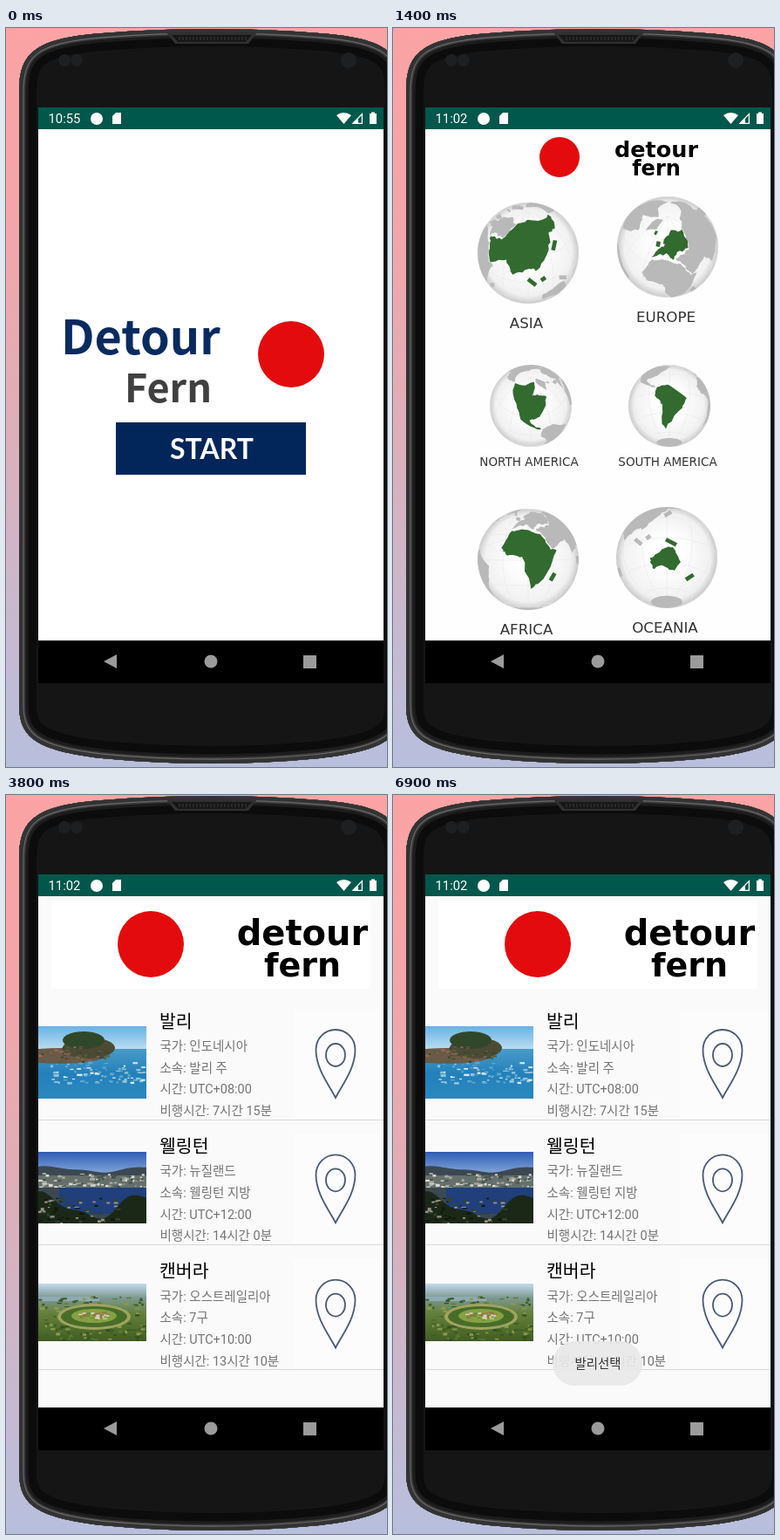
Write an HTML page with a canvas that moves like this. It is 437 px wide and 847 px high and loops after 8000 ms.

```html
<!DOCTYPE html>
<html lang="ko">
<head>
<meta charset="utf-8">
<style>
html, body { margin: 0; width: 100%; height: 100%; overflow: hidden; }
canvas { display: block; }
</style>
</head>
<body>
<canvas id="stage" width="437" height="847"></canvas>
<script>
const W = 437, H = 847, LOOP = 8000, TAU = Math.PI * 2;
const SCREEN = { x: 37, y: 91, w: 396, h: 660, cx: 235, cy: 421 };
const UI = "Roboto, 'Noto Sans CJK KR', sans-serif";
const TITLE = "'Noto Sans CJK KR', 'Noto Sans', sans-serif";
const WIDE = "'DejaVu Sans', sans-serif";
const NAVY = '#02265a', RED = '#e30b0e';

const stage = document.getElementById('stage').getContext('2d');

function layer(paint) {
  const canvas = document.createElement('canvas');
  canvas.width = W;
  canvas.height = H;
  paint(canvas.getContext('2d'));
  return canvas;
}

function random(seed) {
  return () => (seed = seed * 16807 % 2147483647) / 2147483647;
}

function rect(c, color, x, y, w, h) {
  c.fillStyle = color;
  c.fillRect(x, y, w, h);
}

function shape(c, color, path) {
  c.fillStyle = color;
  c.fill(new Path2D(path));
}

function disc(c, color, x, y, rx, ry = rx) {
  c.beginPath();
  c.ellipse(x, y, rx, ry, 0, 0, TAU);
  c.fillStyle = color;
  c.fill();
}

function text(c, str, x, y, font, color, align = 'left') {
  c.font = font;
  c.fillStyle = color;
  c.textAlign = align;
  c.fillText(str, x, y);
}

function gradient(c, y0, y1, colors) {
  const g = c.createLinearGradient(0, y0, 0, y1);
  colors.forEach((color, i) => g.addColorStop(i / (colors.length - 1), color));
  return g;
}

// Phone body and backdrop
const phone = layer(c => {
  rect(c, gradient(c, 0, H, ['#fba3a5', '#f3a6a9', '#e2adb6', '#ccb7ca', '#b7bfdd']), 0, 0, W, H);
  const body = new Path2D('M15 75C15 30 30 12 110 6Q235 -4 360 6C440 12 455 30 455 75' +
    'V775C455 812 438 828 360 837Q235 849 110 837C32 828 15 812 15 775Z');
  c.save();
  c.clip(body);
  rect(c, '#151515', 0, 0, W, H);
  // Nested strokes shade the rim from the inside out
  ['#0c0c0c', '#1c1c1c', '#383838', '#6a6a6a', '#333'].forEach((color, i) => {
    c.lineWidth = 40 / (1 + i * .9);
    c.strokeStyle = color;
    c.stroke(body);
  });
  c.restore();
  shape(c, '#303030', 'M184 5H288L278 18H194Z');
  shape(c, '#171717', 'M190 8H282L275 16H197Z');
  for (let x = 198; x < 276; x += 4) rect(c, '#292929', x, 10, 2, 4);
  for (const x of [67, 81, 393]) disc(c, '#1d1f20', x, 37, x < 100 ? 7 : 9);
});

function windowBase(c, color) {
  rect(c, '#00574b', SCREEN.x, 91, SCREEN.w, 25);
  rect(c, color, SCREEN.x, 116, SCREEN.w, 586);
  rect(c, '#000', SCREEN.x, 702, SCREEN.w, 49);
}

const startScreen = layer(c => {
  windowBase(c, '#fff');
  text(c, 'Detour', 63, 374, 'bold 54px ' + TITLE, '#0a2b60');
  text(c, 'Fern', 136, 429, 'bold 45px ' + TITLE, '#404040');
  disc(c, RED, 327, 374, 38);
  rect(c, NAVY, 126, 452, 218, 60);
  text(c, 'START', 236, 494, 'bold 32px Lato, sans-serif', '#fff', 'center');
});

// Rough coasts as longitude, latitude corners; the coastline between them is seeded noise
const LAND = {
  asia: [27, 38, 50, 43, 62, 68, 100, 76, 188, 67, 160, 54, 138, 53, 121, 30, 107, 15, 97, 17, 78, 8, 68, 24, 45, 13, 35, 30],
  europe: [-9, 37, -2, 48, 9, 54, 6, 60, 26, 71, 60, 67, 50, 45, 30, 45, 23, 37, 13, 45],
  africa: [-7, 35, 10, 37, 32, 31, 43, 12, 51, 11, 35, -22, 20, -35, 9, 4, -8, 5, -17, 14],
  northAmerica: [-166, 66, -95, 79, -68, 80, -92, 59, -77, 60, -56, 52, -81, 28, -97, 24, -80, 8, -106, 21, -124, 44],
  greenland: [-60, 79, -25, 82, -22, 70, -45, 60],
  southAmerica: [-78, 8, -62, 11, -35, -7, -40, -22, -68, -54, -75, -46, -70, -18, -81, -4],
  oceania: [114, -22, 133, -12, 142, -11, 153, -27, 146, -38, 130, -32, 115, -34],
};
const ISLES = [
  ['asia', 96, 4, 105, -5], ['asia', 111, 1, 116, 4], ['asia', 132, 33, 142, 42],
  ['oceania', 134, -2, 146, -8], ['oceania', 168, -46, 177, -38],
  ['africa', 45, -24, 49, -15], ['europe', -3, 51, -4, 57], ['europe', -22, 65, -15, 65],
];
const GLOBES = [
  { name: 'ASIA', land: 'asia', x: 155, y: 258, r: 58, lon: 96, lat: 35 },
  { name: 'EUROPE', land: 'europe', x: 315, y: 251, r: 58, lon: 15, lat: 52 },
  { name: 'NORTH AMERICA', land: 'northAmerica', x: 158, y: 433, r: 47, lon: -95, lat: 45 },
  { name: 'SOUTH AMERICA', land: 'southAmerica', x: 317, y: 433, r: 47, lon: -60, lat: -20 },
  { name: 'AFRICA', land: 'africa', x: 155, y: 609, r: 58, lon: 16, lat: 1 },
  { name: 'OCEANIA', land: 'oceania', x: 314, y: 607, r: 58, lon: 135, lat: -23 },
];

function coastline(corners, seed) {
  const rnd = random(seed), points = [], steps = 5;
  for (let i = 0; i < corners.length; i += 2) {
    const [x0, y0, x1, y1] = [0, 1, 2, 3].map(k => corners[(i + k) % corners.length]);
    for (let k = 0; k < steps; k++) {
      const rough = k ? 3 : 0;
      points.push([x0 + (x1 - x0) * k / steps + (rnd() - .5) * rough,
        y0 + (y1 - y0) * k / steps + (rnd() - .5) * rough]);
    }
  }
  return points;
}

// Orthographic projection; points behind the globe slide to its rim
function project(globe, [lon, lat]) {
  const rad = Math.PI / 180, d = (lon - globe.lon) * rad, a = lat * rad, b = globe.lat * rad;
  const x = Math.cos(a) * Math.sin(d);
  const y = Math.cos(b) * Math.sin(a) - Math.sin(b) * Math.cos(a) * Math.cos(d);
  const front = Math.sin(b) * Math.sin(a) + Math.cos(b) * Math.cos(a) * Math.cos(d) > 0;
  const k = globe.r / (front ? 1 : Math.hypot(x, y));
  return { x: x * k, y: -y * k, front };
}

function trace(c, globe, points) {
  const spots = points.map(p => project(globe, p));
  c.beginPath();
  if (spots.some(s => s.front)) spots.forEach(s => c.lineTo(s.x, s.y));
}

function drawGlobe(c, globe) {
  const r = globe.r, circle = Array.from({ length: 73 }, (_, i) => i * 5 - 180);
  const tint = name => name === globe.land ? '#336a30' : '#b9b9b9';
  c.save();
  c.translate(globe.x, globe.y);
  const shade = c.createRadialGradient(0, -r * .1, r * .3, 0, 0, r);
  shade.addColorStop(0, '#fff');
  shade.addColorStop(.8, '#f1f1f1');
  shade.addColorStop(1, '#c9c9c9');
  disc(c, shade, 0, 0, r);
  c.clip();
  c.strokeStyle = '#e4e4e4';
  c.lineWidth = .5;
  for (let line = -60; line <= 60; line += 30) {
    trace(c, globe, circle.map(lon => [lon, line]));
    c.stroke();
    trace(c, globe, circle.map(lat => [globe.lon + line, lat / 2]));
    c.stroke();
  }
  trace(c, globe, circle.map(lon => [lon, -72]));
  c.fillStyle = '#b9b9b9';
  c.fill();
  Object.keys(LAND).forEach((name, i) => {
    trace(c, globe, coastline(LAND[name], 77 + i));
    c.fillStyle = tint(name);
    c.fill();
  });
  c.lineWidth = r * .08;
  for (const [name, lon0, lat0, lon1, lat1] of ISLES) {
    const ends = [[lon0, lat0], [lon1, lat1]];
    if (!ends.every(p => project(globe, p).front)) continue;
    trace(c, globe, ends);
    c.strokeStyle = tint(name);
    c.stroke();
  }
  c.restore();
  text(c, globe.name, globe.x - 2, globe.y + r * 1.52 - 2, `${r * .288}px ${WIDE}`, '#333', 'center');
}

const globeScreen = layer(c => {
  windowBase(c, '#fefefe');
  disc(c, RED, 191, 148, 23);
  text(c, 'detour', 302, 148, 'bold 25.5px ' + WIDE, '#000', 'center');
  text(c, 'fern', 302, 169, 'bold 24px ' + WIDE, '#000', 'center');
  GLOBES.forEach(globe => drawGlobe(c, globe));
});

// Scenery, drawn from its own top-left corner, 124 wide
function ridge(c, color, y, rise, phase) {
  c.beginPath();
  c.moveTo(0, 90);
  for (let x = 0; x <= 124; x += 4) c.lineTo(x, y - rise * (Math.sin(x / 19 + phase) + Math.sin(x / 8 + phase) * .3));
  c.lineTo(124, 90);
  c.fillStyle = color;
  c.fill();
}

function scatter(c, colors, count, x, y, w, h) {
  const rnd = random(count + 5);
  for (let i = 0; i < count; i++) {
    rect(c, colors[i % colors.length], x + rnd() * w, y + rnd() * h, 2 + rnd() * 4, 1 + rnd() * 2);
  }
}

function coast(c) {
  rect(c, gradient(c, 0, 26, ['#69b2e6', '#b9dcef']), 0, 0, 124, 26);
  rect(c, gradient(c, 26, 83, ['#4a9bc8', '#2380ba', '#2c89bf']), 0, 26, 124, 57);
  scatter(c, ['#8fc3dc', '#d5e8ef', '#5ba6cd'], 80, 14, 40, 106, 24);
  disc(c, '#6a5a48', 24, 34, 52, 9);
  disc(c, '#4b4a34', 58, 25, 30, 12);
  disc(c, '#30472a', 52, 16, 24, 10);
  scatter(c, ['#8f6654', '#3d4630', '#59603c'], 45, 0, 22, 78, 18);
}

function harbour(c) {
  rect(c, gradient(c, 0, 26, ['#2f5cb4', '#86a9dc']), 0, 0, 124, 83);
  ridge(c, '#3b4852', 20, 3, 1);
  rect(c, '#65706c', 0, 27, 124, 14);
  scatter(c, ['#dad8d0', '#3f4f4c', '#a9a89e'], 90, 0, 24, 124, 16);
  rect(c, '#203f7b', 24, 41, 100, 30);
  ridge(c, '#1b2818', 62, 13, 1.4);
  scatter(c, ['#9a9482', '#33432a', '#11190f'], 75, 0, 52, 90, 30);
}

function gardens(c) {
  rect(c, gradient(c, 0, 66, ['#c3dbee', '#7c9890', '#66803e', '#52702d', '#425c24']), 0, 0, 124, 66);
  rect(c, '#8eabb4', 0, 15, 70, 5);
  scatter(c, ['#3f5d28', '#8a9a4c', '#5d7a36', '#34501f'], 140, 0, 14, 124, 50);
  disc(c, '#a0a45f', 64, 38, 42, 15);
  disc(c, '#486d29', 64, 38, 38, 12);
  disc(c, '#86a143', 64, 37, 26, 8);
  scatter(c, ['#d7d5bd', '#9a6d49', '#6c8a3a'], 28, 46, 32, 32, 8);
}

const PLACES = [
  { title: '발리', scene: coast, height: 83,
    lines: ['국가: 인도네시아', '소속: 발리 주', '시간: UTC+08:00', '비행시간: 7시간 15분'] },
  { title: '웰링턴', scene: harbour, height: 82,
    lines: ['국가: 뉴질랜드', '소속: 웰링턴 지방', '시간: UTC+12:00', '비행시간: 14시간 0분'] },
  { title: '캔버라', scene: gardens, height: 66,
    lines: ['국가: 오스트레일리아', '소속: 7구', '시간: UTC+10:00', '비행시간: 13시간 10분'] },
];

function drawPin(c, x, y) {
  c.save();
  c.translate(x, y);
  c.strokeStyle = '#4a5a73';
  c.lineWidth = 1.8;
  c.stroke(new Path2D('M0 79C-7 65 -22.5 46 -22.5 24A22.5 23 0 0 1 22.5 24C22.5 46 7 65 0 79Z'));
  c.beginPath();
  c.ellipse(0, 30, 11, 13, 0, 0, TAU);
  c.stroke();
  c.restore();
}

const listScreen = layer(c => {
  windowBase(c, '#fafafa');
  rect(c, '#fff', 52, 121, 366, 101);
  disc(c, RED, 166, 171, 38);
  text(c, 'detour', 340, 172, 'bold 40px ' + WIDE, '#000', 'center');
  text(c, 'fern', 340, 208, 'bold 38px ' + WIDE, '#000', 'center');
  PLACES.forEach(({ title, scene, height, lines }, i) => {
    const top = 229 + i * 143.3;
    rect(c, '#fcfcfc', 329, top + 16, 104, 126);
    c.save();
    c.translate(37, Math.round(top + 77.5 - height / 2));
    c.beginPath();
    c.rect(0, 0, 124, height);
    c.clip();
    scene(c);
    c.restore();
    text(c, title, 176, top + 37.5, '20.5px ' + UI, '#000');
    lines.forEach((line, n) => text(c, line, 176.5, top + 64 + n * 24.7, '14.5px ' + UI, '#747474'));
    drawPin(c, 378, top + 39);
    rect(c, '#d9d9d9', 37, Math.round(top + 142.5), 396, 1);
  });
});

function drawSystemIcons(c, clock) {
  text(c, clock, 48.5, 109, '14.8px Roboto, sans-serif', '#fff');
  disc(c, '#fff', 104, 104, 7);
  shape(c, '#fff', 'M126 97H132V110H122V101Z');
  shape(c, '#fff', 'M387.5 110L379 100Q387.5 94 396 100Z');
  c.strokeStyle = '#fff';
  c.lineWidth = 1.3;
  c.stroke(new Path2D('M398 109.3L408.4 98.5V109.3Z'));
  shape(c, '#fff', 'M397 110L404 103V110Z');
  shape(c, '#fff', 'M417 98H419V96.5H423V98H425V110H417Z');
  shape(c, '#9b9b9b', 'M112 726L127 718V734Z');
  disc(c, '#9b9b9b', 235, 726, 7.5);
  rect(c, '#9b9b9b', 341, 719, 15, 15);
}

function drawWindow(c, image, scale, alpha = 1) {
  const { x, y, w, h, cx, cy } = SCREEN;
  c.save();
  c.globalAlpha = alpha;
  c.translate(cx, cy);
  c.scale(scale, scale);
  c.drawImage(image, x, y, w, h, x - cx, y - cy, w, h);
  c.restore();
}

// Fast-out, extra-slow-in: a quick first sixth, then a long settling curve
function settle(p) {
  if (p >= .75) return 1;
  if (p < 1 / 6) return .4 * (p * 6) ** 2;
  let lo = 0, hi = 1;
  const bezier = (u, a, b, d) => a * (1 - u) ** 3 + 3 * b * u * (1 - u) ** 2 + 3 * d * u * u * (1 - u) + u ** 3;
  for (let i = 0; i < 20; i++) {
    const mid = (lo + hi) / 2;
    if (bezier(mid, 1 / 6, .2083, .25) < p) lo = mid; else hi = mid;
  }
  return bezier(lo, .4, .82, 1);
}

// The picture is held for 100 ms at a time; `lead` is how far the opening had run at its first picture
function openWindow(c, from, to, elapsed, lead) {
  const time = Math.floor(elapsed / 100) * 100 + lead;
  const progress = settle(time / 400);
  if (progress < 1) drawWindow(c, from, 1 + .05 * progress);
  drawWindow(c, to, .85 + .15 * progress, Math.min(1, (time - 50) / 50));
}

function drawRipple(c, radius, alpha) {
  c.save();
  c.beginPath();
  c.rect(37, 229, 396, 16);
  c.rect(37, 245, 292, 127);
  c.clip();
  disc(c, `rgba(0,0,0,${alpha})`, 231, 300, radius);
  c.restore();
}

function drawToast(c, alpha) {
  c.save();
  c.globalAlpha = alpha;
  c.beginPath();
  c.roundRect(183, 626, 103, 51, 25.5);
  c.fillStyle = '#e9e9e9';
  c.fill();
  text(c, '발리선택', 235, 656.5, '14.4px ' + UI, '#222', 'center');
  c.restore();
}

function draw(t) {
  const c = stage;
  c.drawImage(phone, 0, 0);
  c.save();
  c.beginPath();
  c.rect(SCREEN.x, SCREEN.y, SCREEN.w, SCREEN.h);
  c.clip();
  if (t < 500) drawWindow(c, startScreen, 1);
  else if (t < 3500) openWindow(c, startScreen, globeScreen, t - 500, 109);
  else openWindow(c, globeScreen, listScreen, t - 3500, 71);
  const tap = Math.min(5, Math.floor((t - 6400) / 100));
  if (tap >= 0) {
    drawRipple(c, 112 + tap * 70, .025 * Math.min(1, (5 - tap) / 3));
    drawToast(c, Math.max(0, (tap - 2) / 3) * .92);
  }
  drawSystemIcons(c, t < 1400 ? '10:55' : '11:02');
  c.restore();
}

const began = performance.now();
function tick() {
  draw((performance.now() - began) % LOOP);
  requestAnimationFrame(tick);
}
tick();
</script>
</body>
</html>
```
